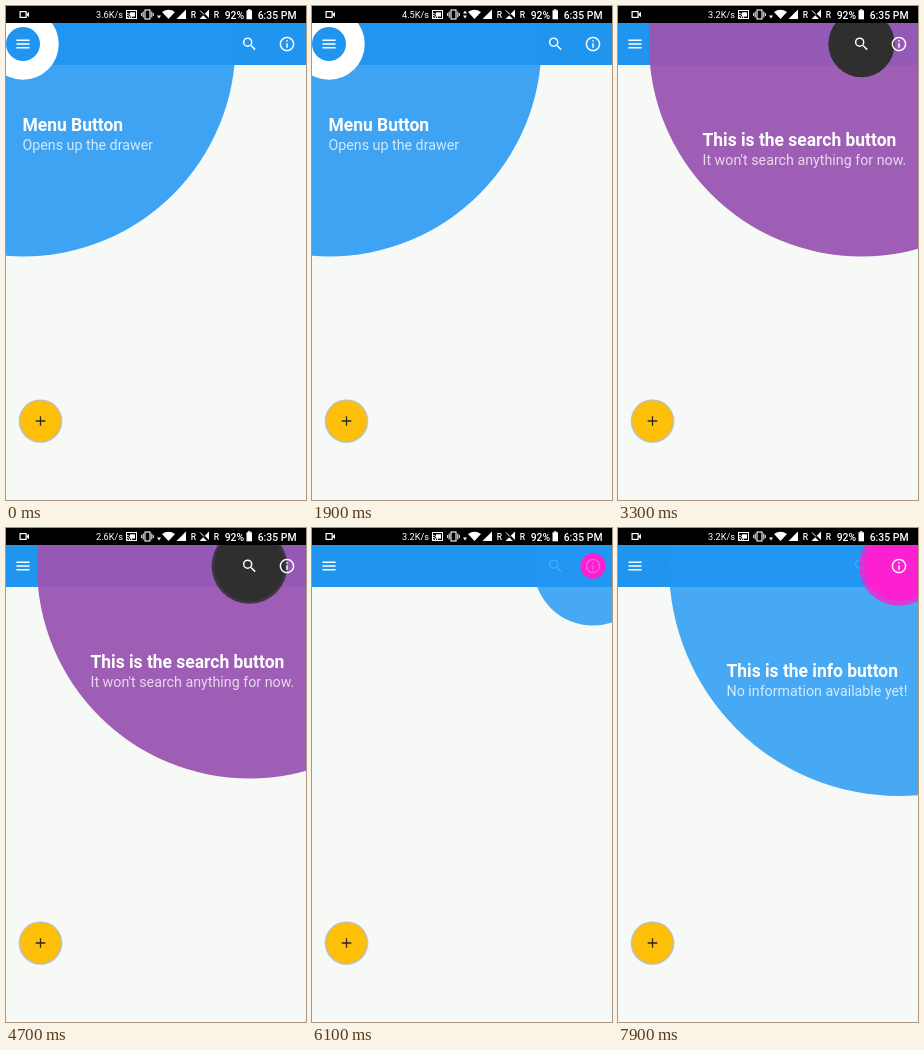
Write an HTML page with a canvas that moves like this. It is 300 px wide and 494 px high and loops after 8 s.

```html
<!DOCTYPE html>
<html lang="en">
<head>
<meta charset="utf-8">
<title>Feature discovery</title>
<style>
html, body { margin: 0; width: 300px; height: 494px; overflow: hidden; background: #f7f9f7; }
canvas { display: block; width: 300px; height: 494px; }
</style>
</head>
<body>
<canvas id="stage"></canvas>
<script>
const W = 300, H = 494, LOOP = 8000, STEP = 100;
const BAR_Y = 38, MOVE = 250, RADIUS = 32.5;
const BLUE = '#2095f0';
const FONT = 'Roboto, "Open Sans", sans-serif';

const canvas = document.getElementById('stage');
const dpr = window.devicePixelRatio || 1;
canvas.width = W * dpr;
canvas.height = H * dpr;
const c = canvas.getContext('2d');
c.scale(dpr, dpr);

const icons = {
  menu: new Path2D('M3 18h18v-2H3v2zm0-5h18v-2H3v2zm0-7v2h18V6H3z'),
  search: new Path2D('M15.5 14h-.79l-.28-.27A6.47 6.47 0 0 0 16 9.5 6.5 6.5 0 1 0 9.5 16c1.61 0 3.09-.59 4.23-1.57l.27.28v.79l5 4.99L20.49 19l-4.99-5zm-6 0A4.5 4.5 0 1 1 14 9.5 4.5 4.5 0 0 1 9.5 14z'),
  info: new Path2D('M11 17h2v-6h-2v6zm1-15C6.48 2 2 6.48 2 12s4.48 10 10 10 10-4.48 10-10S17.52 2 12 2zm0 18c-4.41 0-8-3.59-8-8s3.59-8 8-8 8 3.59 8 8-3.59 8-8 8zM11 9h2V7h-2v2z')
};
const iconX = { menu: 17, search: 243.5, info: 281 };

const targets = [
  { icon: 'menu', r: 212.5, color: '#2196f3', alpha: .86, fill: '#fff', start: -725, end: 2570, period: 950,
    title: 'Menu Button', text: 'Opens up the drawer', x: 16.5, y: 125 },
  { icon: 'search', r: 212.5, color: '#9a56b2', alpha: .95, fill: '#2f2f2f', start: 2835, end: 5765, period: 1040,
    title: 'This is the search button', text: "It won't search anything for now.", x: 84.5, y: 140 },
  { icon: 'info', r: 230, color: '#2196f3', alpha: .82, fill: '#fd20d0', start: 6015, end: Infinity, period: 1040,
    title: 'This is the info button', text: 'No information available yet!', x: 108.5, y: 149 }
];

// [time from which it holds, speed, upload arrow lit]
const speeds = [[0, '3.6', false], [1000, '4.5', true], [2700, '3.2', false], [4400, '2.6', false], [6050, '3.2', false]];

const clamp = v => Math.max(0, Math.min(1, v));
const ease = v => (1 - Math.cos(Math.PI * clamp(v))) / 2;

function disc(x, y, r, fill, alpha = 1) {
  c.globalAlpha = alpha;
  c.fillStyle = fill;
  c.beginPath();
  c.arc(x, y, Math.max(0, r), 0, 7);
  c.fill();
  c.globalAlpha = 1;
}

function poly(fill, ...pts) {
  c.fillStyle = fill;
  c.beginPath();
  for (let i = 0; i < pts.length; i += 2) c.lineTo(pts[i], pts[i + 1]);
  c.fill();
}

function line(color, width, ...pts) {
  c.strokeStyle = color;
  c.lineWidth = width;
  c.beginPath();
  for (let i = 0; i < pts.length; i += 4) {
    c.moveTo(pts[i], pts[i + 1]);
    c.lineTo(pts[i + 2], pts[i + 3]);
  }
  c.stroke();
}

function label(str, x, y, size, weight = 400, alpha = 1) {
  c.globalAlpha = alpha;
  c.fillStyle = '#fff';
  c.font = `${weight} ${size}px ${FONT}`;
  c.fillText(str, x, y);
  c.globalAlpha = 1;
}

function icon(name, alpha = 1) {
  c.save();
  c.translate(iconX[name], BAR_Y);
  c.scale(.73, .73);
  c.translate(-12, -12);
  c.globalAlpha = alpha;
  c.fillStyle = '#fff';
  c.fill(icons[name]);
  c.restore();
}

function screen() {
  c.fillStyle = '#f7f9f7';
  c.fillRect(0, 0, W, H);
  c.fillStyle = BLUE;
  c.fillRect(0, 0, W, 59);
  Object.keys(icons).forEach(name => icon(name));

  disc(34.5, 415.2, 22, '#b5bac8', .55);
  disc(34.5, 415, 21.3, '#b5bac8');
  disc(34.5, 414.8, 20.4, '#fdbf08');
  line('#2b2820', 1.3, 29.7, 415, 39.3, 415, 34.5, 410.2, 34.5, 419.8);
}

function spotlight(s, t) {
  if (t < s.start || t >= s.end + MOVE) return;
  const x = iconX[s.icon];
  const closing = t >= s.end;
  const size = closing ? 1 - ease((t - s.end) / MOVE) : ease((t - s.start) / MOVE);
  const age = Math.min(t, s.end) - s.start - MOVE;

  disc(x, BAR_Y, s.r * size, s.color, s.alpha);

  let inner = RADIUS * (closing ? size : Math.min(1, size * 1.5));
  if (age > 0) {
    const beat = ease(age % s.period / s.period);
    const ring = clamp(beat * 2 - 1);
    if (ring > 0) disc(x, BAR_Y, RADIUS * (1 + ring) * (closing ? Math.sqrt(size) : 1), s.fill, (1 - ring) * (closing ? size : 1));
    if (!closing) inner += RADIUS * .1 * (1 - Math.abs(beat * 2 - 1));
  }
  disc(x, BAR_Y, inner, s.fill);

  const fade = closing ? size * .8 : size;
  if (s.icon === 'menu') disc(x, BAR_Y, 17 * Math.min(1, inner / 17), BLUE, fade);
  icon(s.icon, fade);
  if (s.icon === 'search') icon('info');

  const shown = closing ? 0 : clamp((size - .7) / .3);
  label(s.title, s.x, s.y, 17.45, 700, shown);
  label(s.text, s.x, s.y + 19.3, 14.25, 400, shown * .76);
}

function statusBar(t) {
  const [, speed, up] = speeds.filter(s => t >= s[0]).pop();
  const white = '#fff';
  c.fillStyle = '#000';
  c.fillRect(0, 0, W, 17);

  // camera, cast, vibrate
  c.strokeStyle = white;
  c.lineWidth = 1.2;
  c.strokeRect(14.1, 5.6, 6, 5.8);
  poly(white, 20.5, 8, 23, 5.8, 23, 11.2, 20.5, 9);
  label(speed + 'K/s', 90, 12, 9.2);
  c.strokeStyle = white;
  c.lineWidth = 1;
  c.strokeRect(120.5, 4.5, 10, 8);
  c.fillStyle = white;
  c.fillRect(124, 6.3, 5, 4.3);
  c.lineWidth = .9;
  for (const r of [1.5, 3.4, 5.3]) {
    c.beginPath();
    c.arc(120.5, 12.5, r, -Math.PI / 2, 0);
    c.stroke();
  }
  c.lineWidth = 1.1;
  c.strokeRect(139, 4, 5, 9);
  line(white, 1, 137.2, 5.5, 137.2, 11.5, 145.8, 5.5, 145.8, 11.5, 135.7, 7, 135.7, 10, 147.3, 7, 147.3, 10);

  // network
  if (up) poly(white, 151, 7.5, 155, 7.5, 153, 4.5);
  poly(white, 151, 9.5, 155, 9.5, 153, 12.5);
  c.beginPath();
  c.moveTo(162.5, 13);
  c.lineTo(156, 6);
  c.quadraticCurveTo(162.5, 1.5, 169, 6);
  c.fill();
  poly(white, 170.5, 13, 180, 13, 180, 3.5);
  label('R', 184.7, 12, 8.5, 500);
  poly(white, 193.5, 13, 203, 13, 203, 3.5);
  line('#000', 2.2, 193.5, 4, 202.5, 13);
  line(white, 1, 194, 4.5, 198, 8.5);
  label('R', 207.7, 12, 8.5, 500);

  label('92%', 218.7, 12.6, 10.4, 500);
  c.fillRect(240.5, 4.3, 5.5, 9);
  c.fillRect(242, 3.2, 2.5, 1.5);
  label('6:35 PM', 251.7, 12.6, 10.4, 500);
}

function draw(t) {
  screen();
  targets.forEach(s => spotlight(s, t));
  if (t >= 5700 && t < 5900) disc(250, 42.5, 7.5, '#fff', .35);
  statusBar(t);
}

function tick(now) {
  draw(Math.floor(now % LOOP / STEP) * STEP);
  requestAnimationFrame(tick);
}
draw(0);
const origin = performance.now();
requestAnimationFrame(() => tick(0) || 0);
function loop() {
  draw(Math.floor((performance.now() - origin) % LOOP / STEP) * STEP);
  requestAnimationFrame(loop);
}
</script>
</body>
</html>
```
